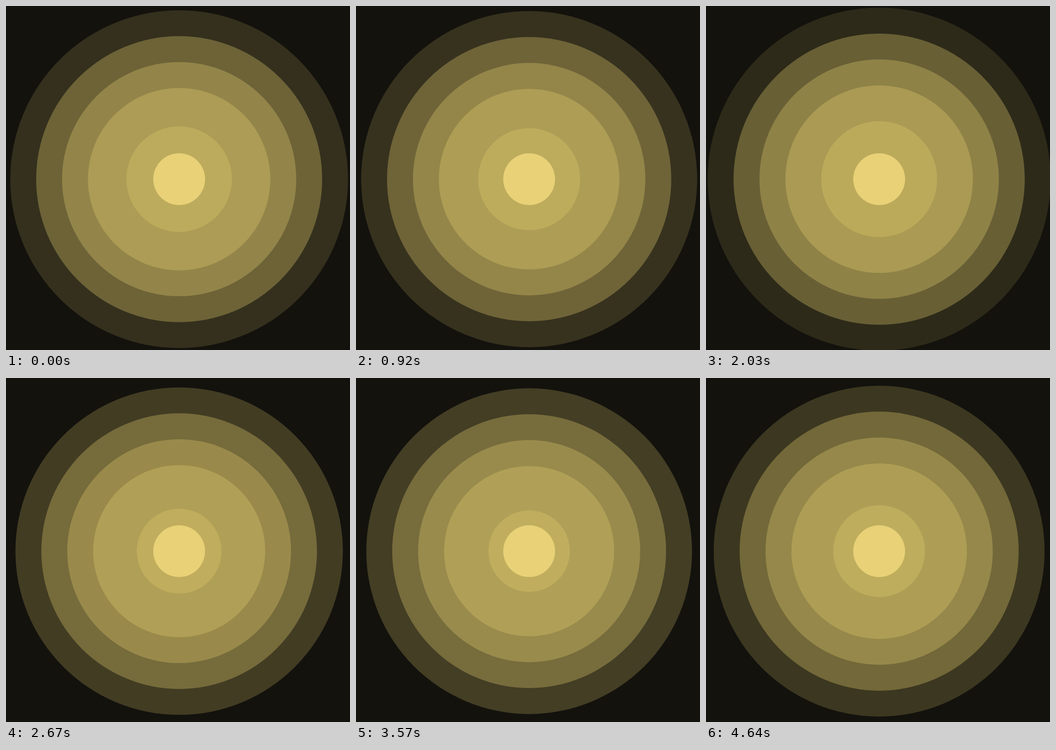
Write an HTML page with a canvas that moves like this. It is 748x748 px and loops after 4.67 s.

```html
<!DOCTYPE html>
<html lang="en">
<head>
<meta charset="utf-8">
<title>Pulse rings</title>
<style>
  html, body { margin: 0; width: 100%; height: 100%; overflow: hidden; background: #13120d; }
  canvas { display: block; }
</style>
</head>
<body>
<canvas id="stage" width="748" height="748"></canvas>
<script>
const ctx = document.getElementById("stage").getContext("2d");
const SIZE = 748, CENTER = 376.5, UNIT = 56.35;
const LOOP = 4670, TICKS = 147, TICKS_PER_PULSE = 30, START_PHASE = 0.518;

// Steps run at a nearly even pace, drifting by about half a tick
function tickAt(ms) {
  const x = ms / LOOP;
  const drift = 0.5 + 0.6 * Math.cos(3.2 * Math.PI * (x - 0.76));
  return Math.min(TICKS - 1, Math.floor(x * TICKS + drift));
}

function disc(radius, color) {
  ctx.fillStyle = color;
  ctx.beginPath();
  ctx.arc(CENTER, CENTER, radius * UNIT, 0, 2 * Math.PI);
  ctx.fill();
}

const glow = alpha => `rgba(222, 202, 110, ${alpha})`;

function draw(ms) {
  const phase = (START_PHASE + tickAt(ms) / TICKS_PER_PULSE) % 1;
  ctx.fillStyle = "#13120d";
  ctx.fillRect(0, 0, SIZE, SIZE);
  disc(6 + phase, glow((1 - phase) / 3));
  for (let ring = 5; ring >= 3; ring--) disc(ring + phase, glow(1 / 3));
  disc(1 + 2 * phase, glow(1 / 3));
  disc(1, "#e8d177");
}

const begin = performance.now();
function loop() {
  draw((performance.now() - begin) % LOOP);
  requestAnimationFrame(loop);
}
loop();
</script>
</body>
</html>
```
